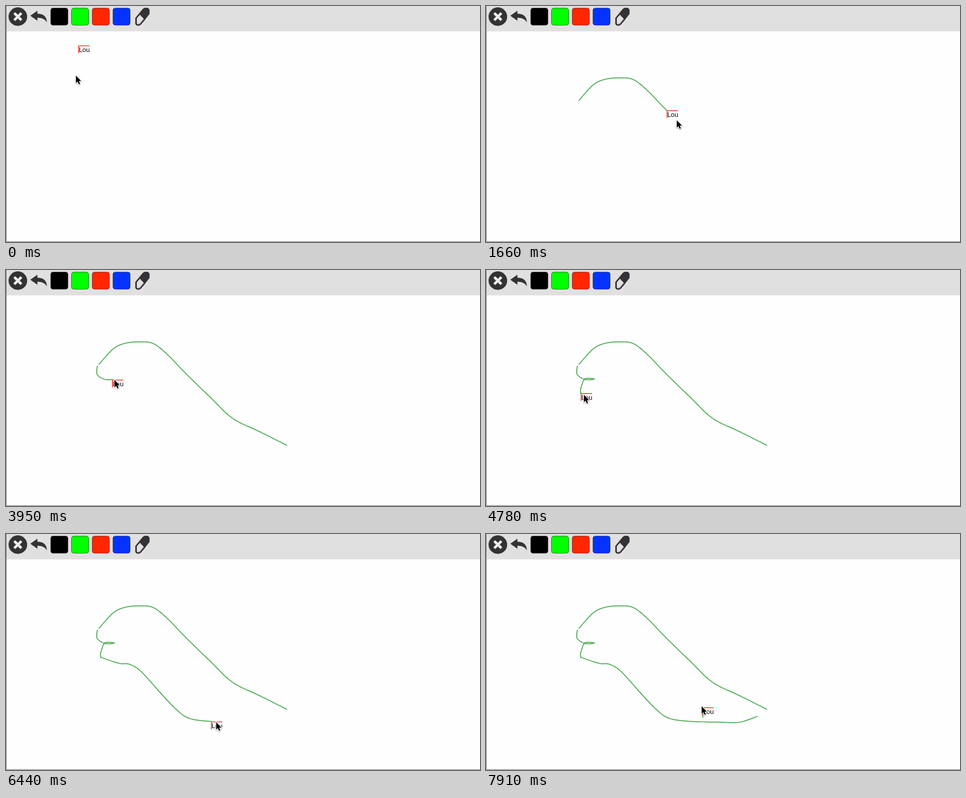
An HTML page with a canvas that plays this animation: 800 by 400 pixels, repeating every 8000 ms.

```html
<!DOCTYPE html>
<html lang="en">
<head>
<meta charset="utf-8">
<title>Shared whiteboard</title>
<style>
  html, body { margin: 0; width: 100%; height: 100%; overflow: hidden; background: #fefefe; }
  canvas { display: block; width: 100%; height: 100%; }
</style>
</head>
<body>
<canvas id="board" width="800" height="400"></canvas>
<script>
const ctx = document.getElementById('board').getContext('2d');
const LOOP = 8000, STEP = 208.38;
const LAG = 0.25; // steps the name tag trails the pointer
const DARK = '#333', BAR = '#e0e0e0', INK = '#43a548', RED = '#f00000';
const USER = 'Lou';

const power = p => u => u ** p;
const smooth = u => u * u * (3 - 2 * u);
const mix = (a, b, u) => a + (b - a) * u;

// The pointer's route: curves through a few points, some of them with the pen down.
const moves = [
  move(0, 4.9, power(0.4), false, [[122,67],[117,117],[135,190],[157,160]]),
  move(4.9, 11.4, smooth, true, [[157,160],[180,134.5],[200,124.5],[225,121.8],[248,124.5],
    [271,142],[304,176],[342,213],[382,251],[426,273],[474,297]]),
  move(11.4, 14, power(0.13), false, [[474,297],[212,170],[164,159]]),
  move(14, 16, power(1), false, [[164,159],[154,163]]),
  move(16, 23, power(0.88), true, [[154,163],[154,177],[167,185.5],[183,185],[167,184.5],
    [160,201],[160,209]]),
  move(23, 34.5, power(1.13), true, [[160,209],[190,219],[209,221],[228,233],[256,264],
    [284,294],[306,311],[337,317],[395,319],[428,319],[458,309]]),
  move(34.5, 36.8, smooth, false, [[458,309],[400,298],[366,311]]),
  move(36.8, 38.25, power(1), true, [[366,311],[365,295],[363,291]])
];

function move(from, to, ease, ink, pts) {
  const line = spline(pts);
  const len = [0];
  for (let i = 1; i < line.length; i++) {
    len.push(len[i - 1] + Math.hypot(line[i][0] - line[i - 1][0], line[i][1] - line[i - 1][1]));
  }
  return { from, to, ease, ink, line, len };
}

// Catmull-Rom curve as a fine polyline.
function spline(pts, n = 16) {
  const at = i => pts[Math.max(0, Math.min(pts.length - 1, i))];
  const line = [pts[0]];
  for (let i = 0; i < pts.length - 1; i++) {
    const [a, b, c, d] = [-1, 0, 1, 2].map(j => at(i + j));
    for (let j = 1; j <= n; j++) {
      const u = j / n;
      line.push([0, 1].map(m => b[m] + u / 2 * (c[m] - a[m]
        + u * (2 * a[m] - 5 * b[m] + 4 * c[m] - d[m]
        + u * (3 * b[m] - a[m] - 3 * c[m] + d[m])))));
    }
  }
  return line;
}

// The part of a move covered at step k; its last point is the tip.
function covered({ from, to, ease, line, len }, k) {
  const u = Math.min(1, (k - from) / (to - from));
  const goal = ease(u) * len[len.length - 1];
  const i = Math.max(1, len.findIndex(l => l >= goal));
  const part = (goal - len[i - 1]) / (len[i] - len[i - 1]);
  const tip = [0, 1].map(m => mix(line[i - 1][m], line[i][m], part));
  return [...line.slice(0, i), tip];
}

function place(k) {
  return covered(moves.findLast(m => m.from <= k), k).pop();
}

function trace(pts, close) {
  ctx.beginPath();
  pts.forEach(p => ctx.lineTo(p[0], p[1]));
  if (close) ctx.closePath();
}

function drawToolbar() {
  ctx.fillStyle = BAR;
  ctx.fillRect(0, 0, 800, 43);

  // close
  ctx.fillStyle = DARK;
  ctx.beginPath();
  ctx.arc(20, 18, 15.7, 0, 7);
  ctx.fill();
  ctx.strokeStyle = '#eee';
  ctx.lineWidth = 4.5;
  ctx.lineCap = 'butt';
  for (const s of [1, -1]) {
    trace([[14, 18 - 6 * s], [26, 18 + 6 * s]]);
    ctx.stroke();
  }

  // undo
  ctx.fillStyle = DARK;
  ctx.beginPath();
  ctx.moveTo(41, 16.5);
  ctx.lineTo(53, 8);
  ctx.lineTo(53, 13);
  ctx.bezierCurveTo(63, 13, 69, 18, 69, 27.5);
  ctx.bezierCurveTo(65, 21.5, 60, 20, 53, 20);
  ctx.lineTo(53, 25);
  ctx.fill();

  ['#000', '#00ff00', '#ff2600', '#0433ff'].forEach((color, i) => {
    ctx.beginPath();
    ctx.roundRect(75.5 + 35 * i, 3.5, 29, 29, 4);
    ctx.fillStyle = color;
    ctx.fill();
    ctx.strokeStyle = 'rgba(0,0,0,.45)';
    ctx.lineWidth = 1;
    ctx.stroke();
  });

  drawEraser();
}

function drawEraser() {
  const top = [[225,14],[231.5,6],[234,4.4],[239,4.4],[241,6.5],[241,13],[233.5,22.8]];
  const bottom = [[227,30.5],[225,32],[221,32],[219.5,30],[219.5,20.5]];
  ctx.lineJoin = 'round';
  ctx.strokeStyle = ctx.fillStyle = DARK;
  ctx.lineWidth = 2.6;
  trace([...top, ...bottom], true);
  ctx.stroke();
  trace(top, true);
  ctx.fill();
}

function drawInk(k) {
  ctx.strokeStyle = INK;
  ctx.lineWidth = 1.5;
  ctx.lineCap = ctx.lineJoin = 'round';
  for (const m of moves.filter(m => m.ink && m.from <= k)) {
    trace(covered(m, k));
    ctx.stroke();
  }
}

function drawTag([px, py]) {
  const x = Math.round(px), y = Math.round(py);
  ctx.fillStyle = RED;
  ctx.fillRect(x, y, 1, 13);
  ctx.fillRect(x, y, 19, 1);
  ctx.fillStyle = '#000';
  ctx.font = '11px "Liberation Sans", Arial, sans-serif';
  ctx.fillText(USER, x + 1, y + 11);
}

function drawPointer([x, y]) {
  ctx.save();
  ctx.translate(x + 1, y + 1);
  ctx.scale(0.88, 0.88);
  trace([[0,0],[0,14.2],[3.2,11.3],[5.6,16.6],[8,15.6],[5.7,10.4],[10,10.2]], true);
  ctx.shadowColor = 'rgba(0,0,0,.35)';
  ctx.shadowBlur = 2;
  ctx.shadowOffsetY = 1;
  ctx.lineWidth = 2;
  ctx.lineJoin = 'miter';
  ctx.strokeStyle = '#fff';
  ctx.stroke();
  ctx.shadowColor = 'transparent';
  ctx.fillStyle = '#000';
  ctx.fill();
  ctx.restore();
}

function draw(now) {
  const t = now % LOOP;
  const k = Math.max(0, Math.floor((t - 188) / STEP) + 1);
  ctx.fillStyle = '#fefefe';
  ctx.fillRect(0, 0, 800, 400);
  drawToolbar();
  ctx.fillStyle = '#808080';
  ctx.fillRect(0, 0, 1, 400);
  ctx.fillRect(0, 399, 800, 1);
  drawInk(k);
  drawTag(place(k));
  drawPointer(place(k + LAG));
}

const start = performance.now();
function tick() {
  draw(performance.now() - start);
  requestAnimationFrame(tick);
}
tick();
</script>
</body>
</html>
```
